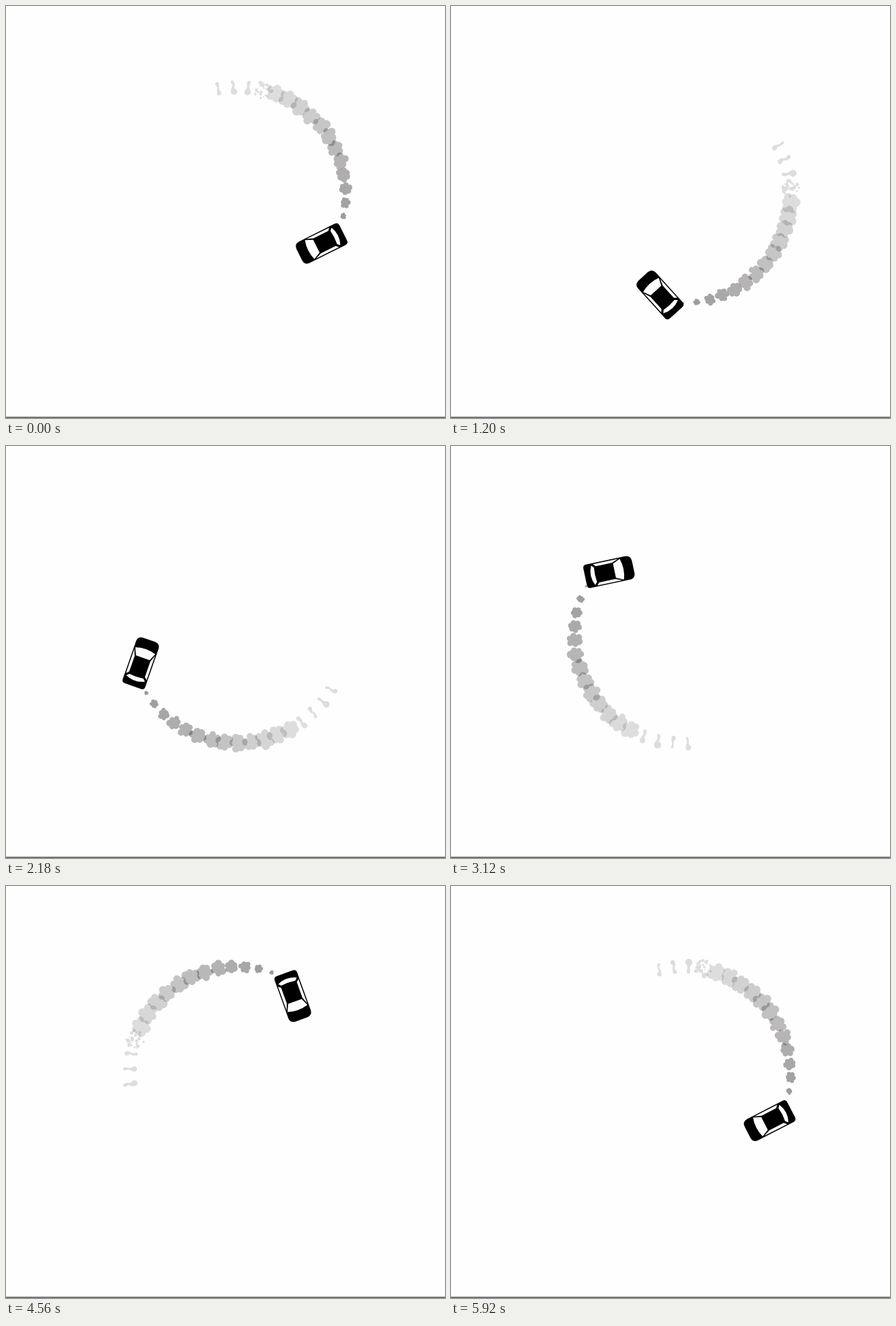
An HTML page for the animation above (5940 ms loop, 644 px wide and 604 px high).

```html
<!DOCTYPE html>
<html>
<head>
<meta charset="utf-8">
<style>
html, body { margin: 0; width: 100%; height: 100%; overflow: hidden; background: #fefefe; }
svg { display: block; width: 644px; height: 604px; }
</style>
</head>
<body>
<svg viewBox="0 0 644 604" xmlns="http://www.w3.org/2000/svg">
  <rect width="644" height="604" fill="#fefefe"/>
  <g id="smoke" fill="#231f20"></g>
  <g id="car">
    <path d="M-31,-17.5H28Q36,-17 36,-9V9Q36,17 28,17.5H-31Q-36,17.5 -36,12V-12Q-36,-17.5 -31,-17.5Z"/>
    <g fill="#fefefe">
      <path d="M19,-15.5Q24,0 19,15.5L8,10.5V-10.5Z"/>
      <path d="M-21,-16H16.5L6.5,-12.2H-17.5Z"/>
      <path d="M-21,16H16.5L6.5,12.2H-17.5Z"/>
      <path d="M-24,-14.5L-20.5,-10.8Q-22,0 -20.5,10.8L-24,14.5Q-31,0 -24,-14.5Z"/>
    </g>
  </g>
  <rect y="602" width="644" height="2" fill="#777"/>
</svg>
<script>
const CX = 339.5, CY = 277, TRAIL = 158.5;
const STEPS = 121, LOOP = 5940;
const BIRTH_LAG = 12.5, SPACING = 7.25, LIFE = 16.65;
const RAD = Math.PI / 180;

// step, position angle, distance from the centre, heading
const DRIVE = [
  [1, 30.2, 142.3, 153.5],
  [24, 102.9, 149.8, 227.8],
  [45, 163.8, 147.3, 289.3],
  [64, 220.7, 141.8, 348],
  [81, 273.1, 140.2, 399.4],
  [103, 337.5, 142.3, 460.9],
  [120, 387.9, 144.3, 512.8]
];
// puff number, angle on the trail
const PUFFS = [
  [-20, -134.7], [0, 11.3], [11, 89.5], [19, 147.5],
  [27, 206.8], [34, 259.6], [43, 324.5], [51, 383.4]
];

function lerpKeys(keys, x, col) {
  if (x <= keys[0][0]) return keys[0][col];
  let i = 1;
  while (i < keys.length - 1 && x > keys[i][0]) i++;
  const a = keys[i - 1], b = keys[i];
  return a[col] + (b[col] - a[col]) * (x - a[0]) / (b[0] - a[0]);
}

// uneven rhythm: four long holds in every 30 / 11 * 4 steps, short ones between
const longHolds = new Set();
for (let m = 0; m < 45; m++) longHolds.add(Math.floor(1.4 + m * 30 / 11));
const ends = [];
for (let i = 0, t = 0; i < STEPS; i++) ends.push(t += longHolds.has(i) ? 100 : 20);

function random(seed) {
  let s = (seed + 40) * 2654435761 >>> 0;
  return () => {
    s = s + 0x6D2B79F5 >>> 0;
    let v = Math.imul(s ^ s >>> 15, 1 | s);
    v = v + Math.imul(v ^ v >>> 7, 61 | v) ^ v;
    return ((v ^ v >>> 14) >>> 0) / 4294967296;
  };
}

function dot(x, y, r) {
  const f = v => v.toFixed(2);
  return `M${f(x - r)},${f(y)}a${f(r)},${f(r)} 0 1 1 ${f(2 * r)},0a${f(r)},${f(r)} 0 1 1 ${f(-2 * r)},0Z`;
}

function cloud(rnd, size) {
  const turn = rnd() * 6.28;
  let d = dot(0, 0, size * 0.55);
  for (let i = 0; i < 6; i++) {
    const a = turn + i * 1.047 + rnd() * 0.3;
    const dist = size * (0.46 + rnd() * 0.24);
    d += dot(Math.cos(a) * dist, Math.sin(a) * dist, size * (0.34 + rnd() * 0.1));
  }
  return d;
}

function crumbs(rnd) {
  let d = '';
  for (let i = 0; i < 34; i++) {
    const a = rnd() * 6.28, dist = 13 * Math.sqrt(rnd());
    d += dot(Math.cos(a) * dist, Math.sin(a) * dist, 0.8 + rnd() * 1.9);
  }
  return d;
}

// the local x axis points away from the centre of the circle
function wisp(rnd, age) {
  const k = 1 - (age - 13) * 0.06;
  const big = 3 + rnd() * 2.6, small = 2 + rnd() * 1.5;
  const side = rnd() < 0.5 ? -1 : 1, bend = (rnd() - 0.5) * 5;
  let d = '';
  for (let i = 0; i <= 6; i++) {
    const u = i / 6;
    const waist = 1 - 0.45 * Math.sin(u * Math.PI);
    const r = (big + (small - big) * u) * waist * k;
    d += dot(side * (u - 0.5) * 14, bend * Math.sin(u * 6.28) * 0.5 + bend * (u - 0.5), r);
  }
  return d;
}

const smoke = document.getElementById('smoke');
const car = document.getElementById('car');
const puffs = [];
for (let n = -18; n <= 50; n++) {
  const el = document.createElementNS('http://www.w3.org/2000/svg', 'path');
  smoke.appendChild(el);
  puffs.push({ n, el, angle: lerpKeys(PUFFS, n, 1) });
}

function place(el, angle, dist, turn) {
  const x = CX + dist * Math.cos(angle * RAD), y = CY + dist * Math.sin(angle * RAD);
  el.setAttribute('transform', `translate(${x.toFixed(2)} ${y.toFixed(2)}) rotate(${turn.toFixed(2)})`);
}

function drawPuff(p, carAngle) {
  const age = (carAngle - p.angle - BIRTH_LAG) / SPACING;
  if (age <= 0 || age > LIFE) {
    p.el.setAttribute('d', '');
    return;
  }
  const rnd = random(p.n);
  let d;
  if (age < 12.45) d = cloud(rnd, 0.8 + 13.6 * (1 - Math.exp(-age / 2.7)));
  else if (age < 13) d = crumbs(rnd);
  else d = wisp(rnd, age);
  const angle = p.angle - Math.max(0, age - 13) * 0.7;
  p.el.setAttribute('d', d);
  p.el.setAttribute('fill-opacity', Math.max(0.145, 0.465 - 0.027 * age).toFixed(3));
  place(p.el, angle, TRAIL, angle);
}

function draw(step) {
  const angle = lerpKeys(DRIVE, step, 1);
  place(car, angle, lerpKeys(DRIVE, step, 2), lerpKeys(DRIVE, step, 3));
  for (const p of puffs) drawPuff(p, angle);
}

let start = null, shown = -1;
function tick(now) {
  if (start === null) start = now;
  const t = (now - start) % LOOP;
  const step = ends.findIndex(end => t < end);
  if (step !== shown && step >= 0) draw(shown = step);
  requestAnimationFrame(tick);
}
draw(0);
requestAnimationFrame(tick);
</script>
</body>
</html>
```
